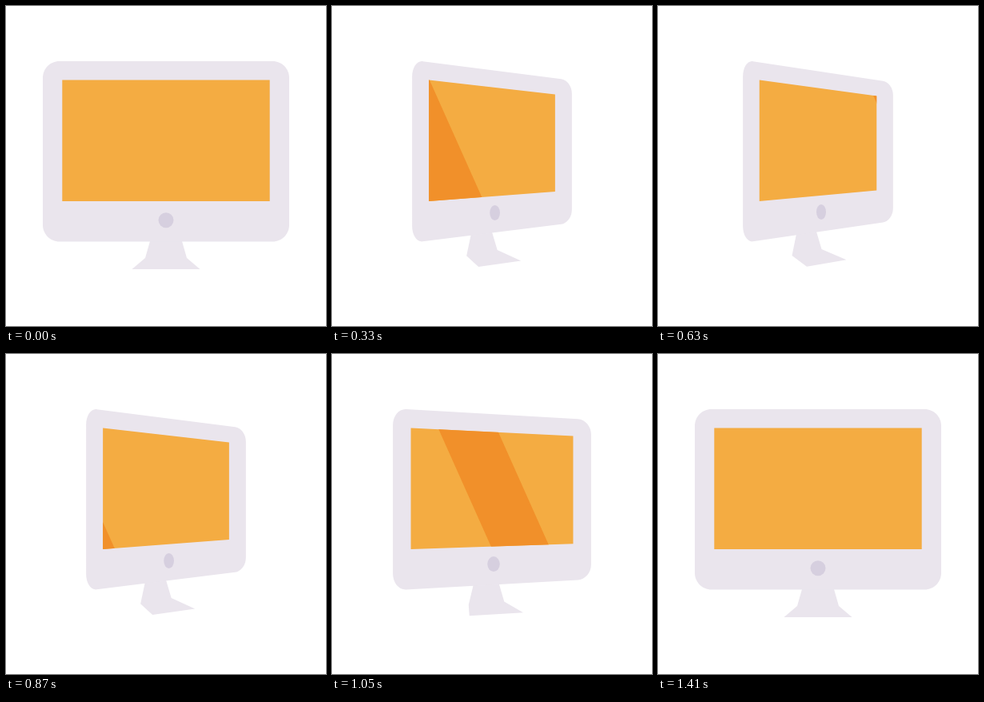
These frames come from a looping animation (400 px wide and 400 px high, 1.62 s). An HTML page:

```html
<!DOCTYPE html>
<html lang="en">
<head>
<meta charset="utf-8">
<title>Turning monitor</title>
<style>
  html, body { margin: 0; width: 100%; height: 100%; overflow: hidden; background: #fff; }
  svg { display: block; width: 100vw; height: 100vh; }
</style>
</head>
<body>
<svg viewBox="0 0 400 400">
  <clipPath id="clip"><path id="mask"/></clipPath>
  <path id="stand" fill="#eae5ed"/>
  <path id="body" fill="#eae5ed"/>
  <path id="screen" fill="#f4ac42"/>
  <path id="shine" fill="#f1902a" clip-path="url(#clip)"/>
  <ellipse id="button" fill="#d6cfdf"/>
</svg>
<script>
const LOOP = 1620, STEP = 30, TURN = 600;
const CX = 200, HORIZON = 183;
const el = id => document.getElementById(id);
const mix = (a, b, k) => a + (b - a) * k;
const mixPt = (a, b, k) => [mix(a[0], b[0], k), mix(a[1], b[1], k)];
const poly = pts => "M" + pts.join("L") + "Z";
const setPath = (id, d) => el(id).setAttribute("d", d);

// Half widths facing front and turned; scale of the near and far side when turned
const screen = { top: 92.4, bottom: 244.1, front: 129.7, turned: 73.2, near: 1, far: 0.778 };
const body = { top: 69, bottom: 294.5, front: 154, turned: 93.8, near: 1.015, far: 0.767 };

// Right half of the front view (mirrored), and the turned outline from top left
const standHalf = [[217.7, 286], [226, 315], [242.5, 329]];
const standFront = [...standHalf.map(([x, y]) => [2 * CX - x, y]), ...standHalf.slice().reverse()];
const standTurned = [[174.6, 277], [167.5, 312], [186, 325.7], [235.5, 317.3], [204.5, 304], [196.2, 276]];

// Corners of a panel, clockwise from top left
function panel(p, k) {
  const half = mix(p.front, p.turned, k);
  const at = (side, y) => {
    const scale = mix(1, side < 0 ? p.near : p.far, k);
    return [CX + side * half, HORIZON + (y - HORIZON) * scale];
  };
  return [at(-1, p.top), at(1, p.top), at(1, p.bottom), at(-1, p.bottom)];
}

// Corners start at a fixed share of each edge
function rounded(quad, shareX, shareY) {
  const corners = quad.map((c, i) => {
    const [back, ahead] = i % 2 ? [shareX, shareY] : [shareY, shareX];
    const a = mixPt(c, quad[(i + 3) % 4], back);
    const b = mixPt(c, quad[(i + 1) % 4], ahead);
    return a + "C" + [mixPt(a, c, 0.55), mixPt(b, c, 0.55), b].join(" ");
  });
  return poly(corners);
}

// Cubic bezier easing (1/3, 0, 0, 1): short start, long settle
function ease(u) {
  let lo = 0, hi = 1;
  for (let i = 0; i < 30; i++) {
    const s = (lo + hi) / 2;
    if (s * (1 - s) ** 2 + s ** 3 < u) lo = s; else hi = s;
  }
  return lo * lo * (3 - 2 * lo);
}

const turnAt = t => t >= 2 * TURN ? 0 : ease(1 - Math.abs(t - TURN) / TURN);

// Leading edge of the shine at mid height; speed fades away from the centre time
function shineAt(t) {
  const [mid, speed] = t < 700 ? [282, 0.79] : [890, 0.775];
  const d = t - mid;
  return 118 + speed * (d - 7.65e-7 * d ** 3);
}

function shinePath(x) {
  const half = 100, lean = half * 0.447, wide = 73, y = 168.5;
  return poly([[x - lean, y - half], [x + lean, y + half],
               [x + lean - wide, y + half], [x - lean - wide, y - half]]);
}

function draw(t) {
  const k = turnAt(t);
  const glass = poly(panel(screen, k));
  setPath("screen", glass);
  setPath("mask", glass);
  setPath("body", rounded(panel(body, k), 0.067, 0.092));
  setPath("stand", poly(standFront.map((pt, i) => mixPt(pt, standTurned[i], k))));
  setPath("shine", shinePath(shineAt(t)));
  const button = { cx: CX + 4 * k, cy: 267.7 - 10.2 * k, rx: 9.5 - 3.5 * k, ry: 9.5 };
  for (const name in button) el("button").setAttribute(name, button[name]);
}

const start = performance.now();
function tick() {
  const t = (performance.now() - start) % LOOP;
  draw(Math.floor((t + 2) / STEP) * STEP % LOOP);
  requestAnimationFrame(tick);
}
tick();
</script>
</body>
</html>
```
